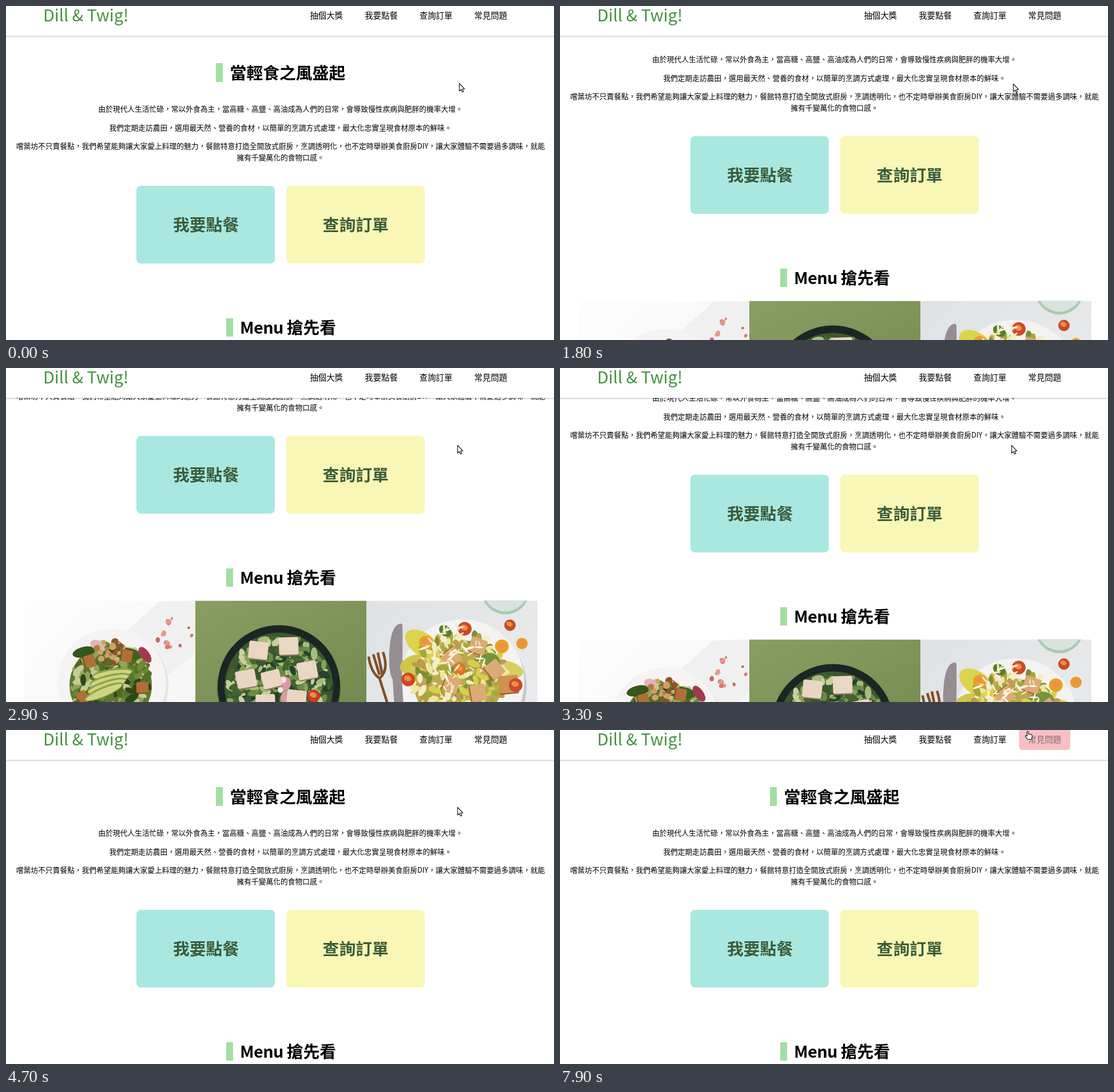
Animation of 958x585 px, one loop 8000 ms. Source, as an HTML page:

```html
<!DOCTYPE html>
<html lang="zh-Hant">
<head>
<meta charset="utf-8">
<title>Dill &amp; Twig!</title>
<style>
html, body { margin: 0; width: 100%; height: 100%; overflow: hidden; background: #fff; }
#stage { display: block; font: 12.75px "Noto Sans CJK TC", "Noto Sans CJK", sans-serif; }
.mid { text-anchor: middle; }
.title { font-size: 28.8px; font-weight: 700; }
.tight { letter-spacing: -.02em; }
.button { fill: #3c5c3b; }
.nav { font-size: 14.4px; }
.logo { font-size: 28.8px; fill: #43913f; }
.header { fill: #fff; filter: drop-shadow(0 1px 1.2px #0004); }
</style>
</head>
<body>
<svg id="stage" width="958" height="585" viewBox="0 0 958 585">
  <defs>
    <linearGradient id="light" x2="1" y2="1"><stop stop-color="#fdfdfd"/><stop offset="1" stop-color="#f5f4f4"/></linearGradient>
    <linearGradient id="green" x2=".5" y2="1"><stop stop-color="#899e62"/><stop offset="1" stop-color="#70874c"/></linearGradient>
    <linearGradient id="stone" x2="1" y2="1"><stop stop-color="#dfe2e5"/><stop offset="1" stop-color="#eceded"/></linearGradient>
  </defs>
  <g id="page">
    <rect x="367" y="100" width="12" height="33" fill="#a1dfa2"/>
    <text class="title" x="391.6" y="128">當輕食之風盛起</text>
    <g class="mid">
      <text x="480" y="185">由於現代人生活忙碌，常以外食為主，當高糖、高鹽、高油成為人們的日常，會導致慢性疾病與肥胖的機率大增。</text>
      <text x="480" y="218">我們定期走訪農田，選用最天然、營養的食材，以簡單的烹調方式處理，最大化忠實呈現食材原本的鮮味。</text>
      <text x="480" y="250">嚐葉坊不只賣餐點，我們希望能夠讓大家愛上料理的魅力，餐館特意打造全開放式廚房，烹調透明化，也不定時舉辦美食廚房DIY，讓大家體驗不需要過多調味，就能</text>
      <text x="480" y="270">擁有千變萬化的食物口感。</text>
    </g>
    <rect x="228" y="315" width="242" height="136" rx="8" fill="#a9e8e0"/>
    <rect x="490" y="315" width="242" height="136" rx="8" fill="#f9f7b5"/>
    <text class="title button mid" x="349.6" y="394">我要點餐</text>
    <text class="title button mid" x="611.2" y="394">查詢訂單</text>
    <rect x="385" y="547" width="12" height="32" fill="#a1dfa2"/>
    <text class="title" x="409" y="574"><tspan class="tight">Menu </tspan>搶先看</text>
    <g id="photos"></g>
  </g>
  <rect class="header" x="-9" y="-9" width="976" height="61.5"/>
  <text class="logo" x="65" y="27">Dill &amp; Twig!</text>
  <rect id="glow" x="802.5" y="-6" width="89.5" height="41" rx="6" fill="#f6c0c5"/>
  <g class="nav mid">
    <text x="560.2" y="22">抽個大獎</text>
    <text x="656" y="22">我要點餐</text>
    <text x="751.6" y="22">查詢訂單</text>
    <text id="faq" x="847.4" y="22">常見問題</text>
  </g>
  <g fill="#fff" stroke="#111" stroke-width="1.1" stroke-linejoin="round">
    <path id="arrow" d="M.5 .5V14L3.6 11.2 5.6 15.8 7.8 14.8 5.8 10.3H9.8Z"/>
    <path id="hand" d="M0 9V1.6Q1.2 0 2.4 1.6V6Q3.8 5 4.8 6.2 6.2 5.4 7 6.7 8.6 6.4 8.8 8V11L7.6 15H1L-3 9.6Q-3 7.6-1.4 8Z"/>
  </g>
</svg>
<script>
const $ = id => document.getElementById(id);

// Small seeded generator keeps the salads the same on each load
let seed = 7;
const rand = () => (seed = seed * 16807 % 2147483647) / 2147483647;

const oval = (x, y, rx, ry, fill, turn = 0) =>
  `<ellipse rx="${rx}" ry="${ry}" fill="${fill}" transform="translate(${x} ${y}) rotate(${turn})"/>`;
const disc = (x, y, r, fill) => oval(x, y, r, r, fill);
const shape = (d, fill) => `<path d="${d}" fill="${fill}"/>`;
const repeat = (n, draw) => Array.from({ length: n }, (_, i) => draw(i)).join('');

const scatter = (x, y, r, n, size, slim, colors) => repeat(n, () => {
  const a = rand() * 6.283, d = r * Math.sqrt(rand()), s = size * (.5 + rand());
  return oval(x + d * Math.cos(a), y + d * Math.sin(a), s, s * slim, colors[rand() * colors.length | 0], rand() * 180);
});

// Places n items evenly around a circle
const ring = (x, y, r, n, degrees, draw) => repeat(n, i => {
  const a = (degrees + i * 360 / n) * Math.PI / 180;
  return draw(x + r * Math.cos(a), y + r * Math.sin(a), i);
});

// Square piece of food with a darker lower edge
const chunk = (x, y, size, fill, shade, turn) =>
  `<g transform="translate(${x} ${y}) rotate(${turn})">` + [shade, fill].map((color, i) =>
    `<rect x="${-size / 2}" y="${-size / 2 - 2 * i}" width="${size}" height="${size * .9}" rx="3" fill="${color}"/>`).join('') + '</g>';

const tomato = (x, y, r, fill) => disc(x, y, r, fill) + oval(x - 1, y - 2, r * .55, r * .4, '#ee8f4a', 20);

const photo = (i, fill, body) =>
  `<svg x="${32 + 299 * i}" y="603.5" width="299" height="299"><rect width="299" height="299" fill="url(#${fill})"/>${body}</svg>`;

const avocadoSalad =
  shape('M176 55 236 2 299 0V92L238 142Z', '#f1f0f0') +
  scatter(262, 61, 32, 14, 4.2, .8, ['#d9776b', '#c9695f', '#e39a8c']) +
  disc(156, 148, 96, '#e6e4e2') + disc(153, 144, 95, '#f5f4f2') + disc(151, 148, 72, '#5f7730') +
  scatter(151, 146, 68, 190, 9, .5, ['#4d6a22', '#6f8a34', '#91a555', '#2d4717', '#c3cb97', '#55702a']) +
  oval(104, 90, 20, 9, '#35561c', -14) + oval(182, 93, 24, 10, '#3f6120', 10) +
  oval(126, 77, 11, 8, '#e3b4b8', 20) + oval(211, 95, 8, 16, '#a43852', -35) +
  scatter(148, 88, 26, 26, 4.5, .9, ['#b77d42', '#d0a168', '#8b5629']) +
  ring(151, 146, 56, 5, 9, (x, y, i) => chunk(x, y, 21, '#b06f36', '#87491f', i * 25)) +
  repeat(4, i => oval(154 - 5 * i, 128 + 10.5 * i, 36, 9, '#8ea23f', -8 - 5 * i) +
    oval(154 - 5 * i, 129 + 10.5 * i, 34, 6.5, '#cdd486', -8 - 5 * i));

const flatbreadSalad =
  disc(146, 154, 108, '#576c3a') + disc(146, 150, 107, '#1b2523') + disc(146, 151, 95, '#3b5730') +
  scatter(146, 151, 88, 300, 8, .5, ['#87a35a', '#a8bd7c', '#42642d', '#6a8b45', '#26402a', '#c5d0a0']) +
  scatter(148, 160, 22, 5, 9, 1, ['#f3e6e3', '#dc98a6']) +
  chunk(134, 141, 33, '#ead6c2', '#8d7c5a', -14) +
  ring(143, 133, 54, 6, -128, (x, y, i) => chunk(x, y, 34, '#ead6c2', '#8d7c5a', 6 - 8 * (i % 3))) +
  tomato(207, 167, 11, '#c83b20');

const chickenSalad =
  disc(243, -18, 42, '#a9c9b0') + disc(243, -20, 39, '#d9e3de') +
  disc(170, 150, 110, '#c5c8ca') + disc(167, 142, 109, '#f4f3f1') +
  shape('M60 40Q42 42 40 92 39 128 46 138L50 200H66L62 138Q64 88 63 42Z', '#968d90') +
  `<path d="M4 98Q8 126 23 136L40 190M12 94 23 130M20 91 28 130M29 90Q40 122 23 136" fill="none" stroke="#805027" stroke-width="4.5"/>` +
  oval(160, 142, 78, 74, '#b9ac50') +
  oval(98, 76, 34, 20, '#ded34c', 35) + oval(86, 112, 28, 17, '#cfc74a', -15) + oval(247, 120, 28, 14, '#d6cf60', 15) +
  scatter(160, 134, 82, 240, 8, .5, ['#d9cf4f', '#a5a83a', '#efe6a0', '#7c8f35', '#f4ecc8', '#c09a4e']) +
  oval(138, 53, 12, 9, '#587c2c', 40) + oval(218, 104, 16, 12, '#75943a', 20) +
  ring(180, 122, 42, 5, -71, (x, y, i) => chunk(x, y, 29, '#dcab75', '#a2652f', 20 + 30 * i)) +
  chunk(249, 150, 34, '#cf9250', '#8f5524', -5) +
  ring(167, 143, 94, 8, -87, (x, y, i) => tomato(x, y, 12, i % 2 ? '#eaa028' : '#cd4828')) +
  tomato(163, 120, 11, '#d97825') + tomato(251, 43, 10, '#c64c25') + tomato(272, 75, 10, '#eb9b25') +
  scatter(150, 100, 56, 60, 7, .2, ['#fbf5dd', '#f3e9c6', '#fffbee']);

$('photos').innerHTML =
  photo(0, 'light', avocadoSalad) + photo(1, 'green', flatbreadSalad) + photo(2, 'stone', chickenSalad);

// Progress from 0 to 1, moving once every 100 ms
const ramp = (t, start, steps) => Math.max(0, Math.min(1, (Math.floor((t - start) / 100) + 1) / steps));
const easeOut = p => 1 - (1 - p) ** 1.045;

// Wheel turns: start, steps, notches
const notch = 42.7;
const turns = [[1400, 2, 1], [1700, 8, 4], [2900, 5, -2], [3500, 4, -2], [4400, 4, -1]];
const scrollAt = t => notch * turns.reduce((sum, [start, steps, n]) => sum + n * easeOut(ramp(t, start, steps)), 0);

function place(node, visible, x, y) {
  node.style.display = visible ? '' : 'none';
  node.setAttribute('transform', `translate(${x} ${y})`);
}

function draw() {
  const t = performance.now() % 8000;
  const leave = ramp(t, 5600, 6), enter = ramp(t, 7600, 4);
  const x = enter ? 819 - 2.5 * enter : 792 - 3 * ramp(t, 2900, 1) + 30 * leave;
  const y = enter ? 13.5 * enter - 12 : 135 + ramp(t, 1700, 1) - ramp(t, 2900, 1) - 160 * leave;
  const hover = y < 35;
  const glow = enter || (hover && leave < 1 ? 2 * leave - 1 : 0);

  $('page').setAttribute('transform', `translate(0 ${-Math.round(scrollAt(t))})`);
  $('glow').setAttribute('opacity', glow);
  $('faq').setAttribute('fill-opacity', 1 - .55 * glow);
  place($('arrow'), !hover, x, y);
  place($('hand'), hover, x, y);
  requestAnimationFrame(draw);
}
draw();
</script>
</body>
</html>
```
